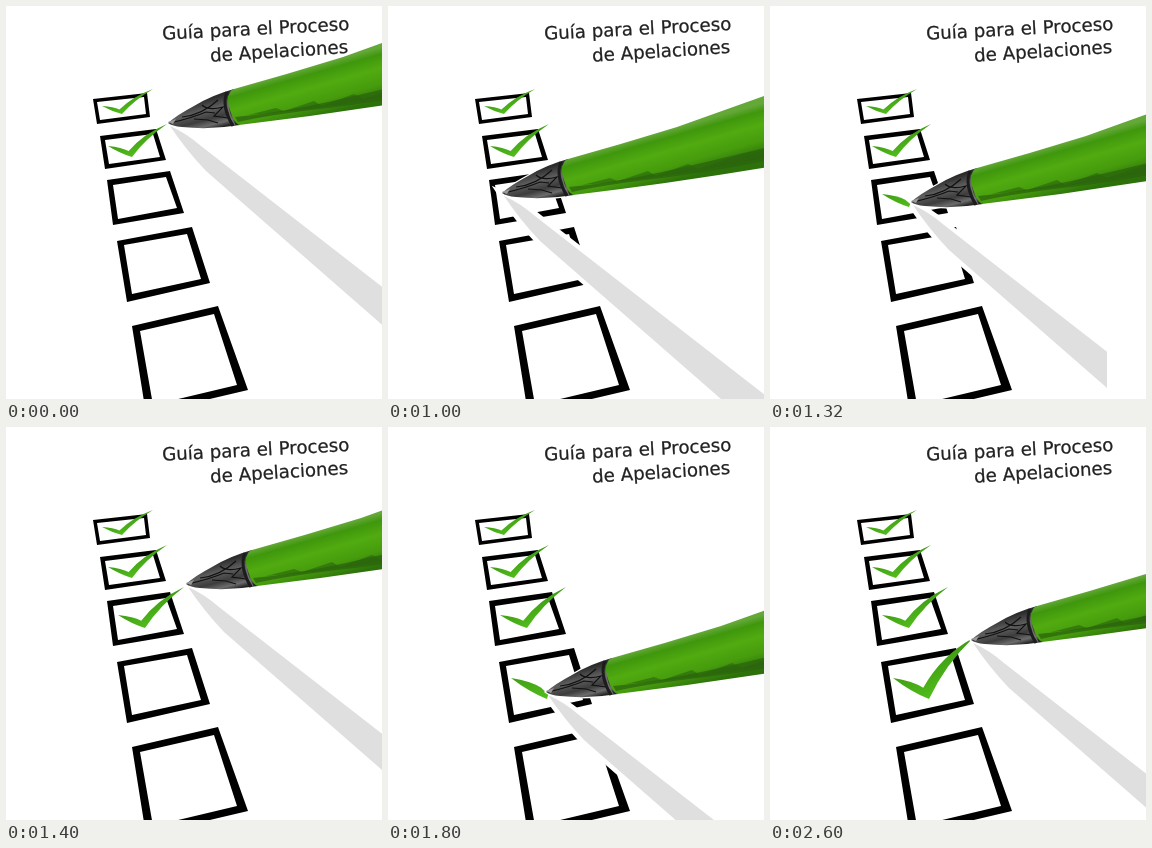
Recreate the animation shown at these times as an HTML page. Size 376 px wide and 393 px high, loop 3000 ms.

```html
<!DOCTYPE html>
<html lang="es">
<head>
<meta charset="utf-8">
<title>Guía</title>
<style>
html, body { margin: 0; width: 100%; height: 100%; overflow: hidden; background: #fff; }
svg { display: block; width: 376px; height: 393px; }
text { font: 18.2px "DejaVu Sans", Verdana, sans-serif; text-anchor: end; fill: #222; stroke: #222; stroke-width: .25; }
</style>
</head>
<body>
<svg viewBox="0 0 376 393">
  <defs>
    <linearGradient id="barrel" gradientUnits="userSpaceOnUse" x1="142" y1="-56" x2="156" y2="-7">
      <stop offset="0" stop-color="#64a838"/>
      <stop offset=".14" stop-color="#3f970c"/>
      <stop offset=".4" stop-color="#51ab10"/>
      <stop offset=".7" stop-color="#469c0d"/>
      <stop offset="1" stop-color="#2c710a"/>
    </linearGradient>
    <linearGradient id="steel" gradientUnits="userSpaceOnUse" x1="38" y1="-24" x2="46" y2="6">
      <stop offset="0" stop-color="#2b2b2b"/>
      <stop offset=".35" stop-color="#5e5e5e"/>
      <stop offset=".65" stop-color="#3c3c3c"/>
      <stop offset=".85" stop-color="#6c6c6c"/>
      <stop offset="1" stop-color="#252525"/>
    </linearGradient>
    <linearGradient id="ink" x1="0" y1="0" x2="1" y2="0">
      <stop offset="0" stop-color="#3f9d14"/>
      <stop offset="1" stop-color="#52bd1c"/>
    </linearGradient>
    <clipPath id="cut"><rect id="cutBox" width="376" height="393"/></clipPath>
  </defs>
  <rect width="376" height="393" fill="#fff"/>
  <text transform="translate(343.5 24) rotate(-3)">Guía para el Proceso</text>
  <text transform="translate(342.5 47) rotate(-3.6)">de Apelaciones</text>
  <path id="boxes" fill="#000" fill-rule="evenodd"/>
  <g clip-path="url(#cut)">
    <path id="shadow" d="M2 3Q18 10 33 23L290 223V268L38 48Q18 27 2 3Z" fill="#dfdfdf" stroke="#fff" stroke-width="9" paint-order="stroke"/>
  </g>
  <g id="checks" fill="url(#ink)"></g>
  <g id="pen">
    <path d="M0 0Q9-8 26-17Q44-28 66-34L72 2Q42 7 14 4Q4 3 0 0Z" fill="url(#steel)" stroke="#fff" stroke-width="2.5" paint-order="stroke"/>
    <path d="M2 0Q24-5 38-11L47-10M14-6Q34-8 50-23M34-18Q40-12 55-16L46-7L60-5M26-4L40-3L50 0" fill="none" stroke="#111" stroke-width="1.2"/>
    <path d="M59-31Q53-17 65 3" fill="none" stroke="#1c1c1c" stroke-width="3"/>
    <path d="M62-29Q56-16 67 2" fill="none" stroke="#777" stroke-width="1"/>
    <path d="M0-1L8-4L5 1Z" fill="#999"/>
    <path d="M66-34Q120-49 175-66L290-107V-30Q180-11 71 2Q66 0 62-13T61-28Q62-33 66-34Z" fill="url(#barrel)"/>
    <path d="M67-6Q110-10 160-21T290-52V-38Q220-22 160-15T70-1Z" fill="#2b650c" opacity=".75"/>
    <path d="M80-8L108-15L116-12L146-22L154-17L186-29L196-24L240-39L290-49V-41Q170-14 80-8Z" fill="#2b650c" opacity=".6"/>
  </g>
</svg>
<script>
const $ = id => document.getElementById(id);

// Outer corners, then inner corners
const boxes = [
  "M87 93L141 87L144 111L91 118ZM91 96L138 91L140 108L94 114Z",
  "M94 130L150 123L160 154L99 163ZM99 134L147 128L154 151L103 158Z",
  "M101 174L164 165L178 207L107 219ZM107 179L160 171L171 202L112 213Z",
  "M111 235L186 221L204 277L121 296ZM118 239L181 228L195 273L126 288Z",
  "M126 320L212 300L242 384L140 408ZM134 325L208 308L231 379L147 399Z"
];
$("boxes").setAttribute("d", boxes.join(""));

// Checks live in a skewed unit space: x runs start to foot, y runs start to tail
const FULL = "M0 0Q.33.1.64.09Q.05.577 0 1Q.333.5 1 0Q.59-.04 0 0Z";
const HALF = "M0 0Q.33.1.64.09L.9.06L1 0Q.59-.04 0 0Z";
const marks = [
  [20, 8, 51, -17, 96, 100],
  [24, 11, 59, -22, 102, 140],
  [27, 13, 66, -28, 112, 188],
  [36, 21, 80, -40, 123, 251]
].map(m => {
  const p = document.createElementNS("http://www.w3.org/2000/svg", "path");
  p.setAttribute("transform", `matrix(${m})`);
  return $("checks").appendChild(p);
});

// start time, nib x, nib y, checks drawn, right end of shadow
const poses = [
  [0, 162, 117, 2, 376],
  [1000, 114, 187, 2, 376],
  [1200, 141, 196, 2.5, 337],
  [1400, 180, 157, 3, 376],
  [1600, 125, 251, 3, 376],
  [1800, 158, 265, 3.5, 376],
  [2000, 201, 213, 4, 376]
];

function draw(t) {
  const [, x, y, done, edge] = poses.filter(p => p[0] <= t).pop();
  for (const id of ["pen", "shadow"]) $(id).setAttribute("transform", `translate(${x} ${y})`);
  $("cutBox").setAttribute("width", edge);
  marks.forEach((p, i) => {
    const part = done - i;
    p.setAttribute("d", part >= 1 ? FULL : part > 0 ? HALF : "");
  });
}

const start = performance.now();
function tick() {
  draw((performance.now() - start) % 3000);
  requestAnimationFrame(tick);
}
tick();
</script>
</body>
</html>
```
